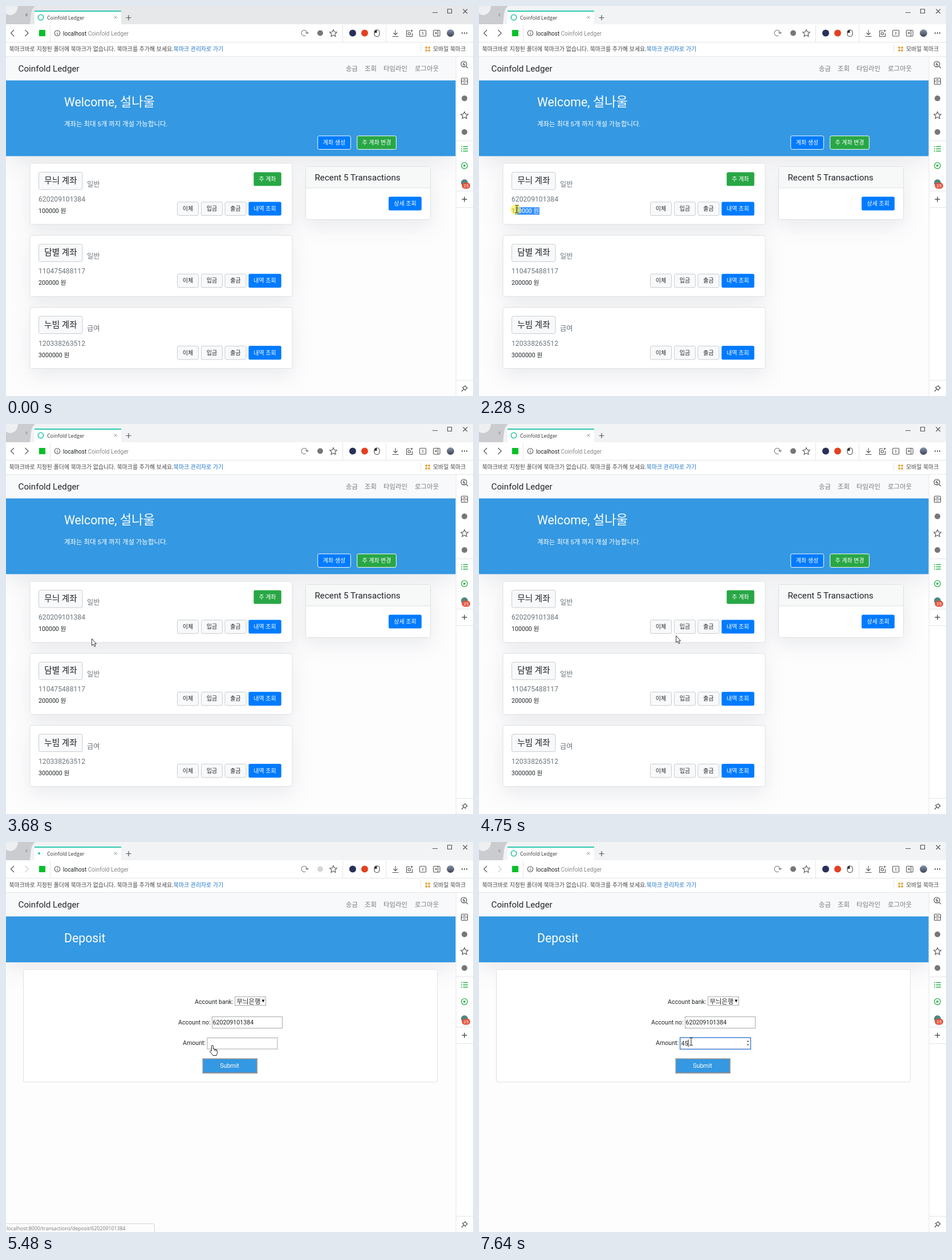
Recreate the animation shown at these times as an HTML page. Size 819 by 684 pixels, loop 8 s.

```html
<!DOCTYPE html>
<html lang="ko">
<head>
<meta charset="utf-8">
<title>Coinfold Ledger</title>
<style>
html, body { margin: 0; width: 100%; height: 100%; overflow: hidden; background: #fdfdfe; }
svg { display: block; }
text { font-family: Roboto, "Noto Sans CJK KR", "Noto Sans CJK", sans-serif; font-size: 10.64px; fill: #212529; white-space: pre; }
.ui { font-family: "Open Sans", "Noto Sans CJK KR", "Noto Sans CJK", sans-serif; font-size: 8.9px; fill: #333; }
.bar { font-family: "Noto Sans CJK KR", "Noto Sans CJK", sans-serif; font-size: 9.9px; fill: #444; }
.h1 { font-size: 21.3px; fill: #fff; }
.h5 { font-size: 15.2px; }
.nav { font-size: 11.4px; fill: #777b80; }
.mid { text-anchor: middle; }
.ko { font-size: 10px; }
.name { font-size: 14.6px; font-weight: 300; }
.num { font-size: 12.16px; fill: #6c757d; }
.type { font-size: 12.3px; fill: #6c757d; }
.white, .sel text { fill: #fff; }
.banner { fill: #3498e2; filter: drop-shadow(0 12px 18px rgba(30,40,60,.09)); }
.card { fill: #fff; stroke: #dfe0e1; }
.lift { filter: drop-shadow(0 12px 17px rgba(30,40,60,.09)); }
.btn { fill: #f8f9fa; stroke: #c9ccd0; }
.blue { fill: #007bff; }
.green { fill: #28a745; }
.input { fill: #fff; stroke: #a9a9a9; }
.line { fill: none; stroke: #e4e5e7; }
.icon { fill: none; stroke: #555; stroke-width: 1.2; }
.off { opacity: .3; }
</style>
</head>
<body>
<svg width="819" height="684" viewBox="0 0 819 684">
  <defs>
    <clipPath id="clip">
      <rect id="selAmount" y="353" height="13"/>
      <rect id="selNumber" x="57" y="331" width="85" height="16"/>
      <rect id="selType" x="139" y="304" width="29" height="18"/>
    </clipPath>
    <linearGradient id="face" x2="0" y2="1"><stop stop-color="#8796b0"/><stop offset="1" stop-color="#3c4350"/></linearGradient>
  </defs>

  <g id="home">
    <rect class="banner" y="130" width="789" height="133.300"/>
    <text class="h1" x="102" y="176">Welcome, <tspan font-size="22.2" font-weight="300">설나울</tspan></text>
    <text class="white" x="102" y="211" style="font-size:11.45px">계좌는 최대 5개 까지 개설 가능합니다.</text>
    <g stroke="#fff"><rect class="blue" x="546.7" y="227.8" width="57.700" height="23.600" rx="2.5"/><rect class="green" x="615.7" y="227.8" width="68.600" height="23.600" rx="2.5"/></g>
    <text class="ko mid white" x="575.5" y="243">계좌 생성</text>
    <text class="ko mid white" x="650" y="243">주 계좌 변경</text>
    <g id="cards"></g>
    <rect class="green" x="434.4" y="291.4" width="48.400" height="24.200" rx="2.5"/>
    <text class="ko mid white" x="458.500" y="306.500">주 계좌</text>
    <g id="sel" class="sel" clip-path="url(#clip)">
      <rect x="50" y="300" width="120" height="70" fill="#3390ff"/>
      <text class="type" x="142" y="317">일반</text>
      <text class="num" x="57" y="343">620209101384</text>
      <text x="57" y="363">100000 원</text>
    </g>
    <rect class="card lift" x="525.5" y="281.500" width="219" height="93" rx="3"/>
    <path d="M526 282H744V319H526z" fill="#f7f8f8"/>
    <path class="line" d="M526 319H744" style="stroke:#dfe0e1"/>
    <text class="h5" x="541.500" y="306">Recent 5 Transactions</text>
    <rect class="blue" x="671" y="334.4" width="57.800" height="24.200" rx="2.5"/>
    <text class="ko mid white" x="700" y="350">상세 조회</text>
  </g>

  <g id="deposit">
    <rect class="banner" y="130" width="789" height="81"/>
    <text class="h1" x="102" y="176">Deposit</text>
    <rect class="card" x="30.500" y="223.500" width="726" height="197.500" rx="3"/>
    <text x="331" y="284">Account bank:</text>
    <rect class="input" x="401.500" y="271.500" width="54" height="15"/>
    <text x="404.500" y="283.500" style="font-size:11.4px">무늬은행</text>
    <path d="M448.500 276.500H453.500L451 281.500z" fill="#111"/>
    <text x="302" y="320">Account no:</text>
    <rect class="input" x="361.500" y="306.500" width="123" height="20"/>
    <text x="362.500" y="320">620209101384</text>
    <text x="310" y="356">Amount:</text>
    <rect class="input" x="353" y="343.500" width="123" height="19.500"/>
    <rect id="focus" x="352.500" y="343" width="124" height="20.500" fill="none" stroke="#4d8ce4" stroke-width="1.4"/>
    <path id="spin" d="M469.500 350.500L471.500 348L473.500 350.500zM469.500 354.500L471.500 357L473.500 354.500z" fill="#444"/>
    <text id="amount" x="354.500" y="356.500"></text>
    <path id="caret" d="M0 346.500V359.500" stroke="#111"/>
    <path d="M344 379H441V406H344z" fill="#8f9499"/>
    <path d="M346 381H439V404H346z" fill="#3498e2"/>
    <path d="M344.500 405.500V379.500H440.500" fill="none" stroke="#c3c7cb"/>
    <text class="mid white" x="392" y="396">Submit</text>
  </g>

  <path d="M0 88H789V130.600H0z" fill="#f8f9fa"/>
  <text class="h5" x="21.500" y="115">Coinfold Ledger</text>
  <text class="nav" x="596" y="113.500">송금</text>
  <text class="nav" x="629" y="113.500">조회</text>
  <text class="nav" x="662" y="113.500">타임라인</text>
  <text class="nav" x="717" y="113.500">로그아웃</text>

  <g id="status">
    <path d="M-1 669.500H258Q260.500 669.500 260.500 672V685H-1z" fill="#fdfdfd" stroke="#d2d4d6"/>
    <text class="ui" x="1" y="681" style="font-size:8.73px;fill:#777">localhost:8000/transactions/deposit/620209101384</text>
  </g>

  <!-- sidebar -->
  <path d="M788.600 88H819V684H788.600z" fill="#fff"/>
  <path class="line" d="M789.200 88V684M790 236.500H819M790 324.500H819M790 353.500H819M790 656.500H819"/>
  <g class="icon">
    <circle cx="803" cy="102" r="5"/><path d="M807 106L810 109M804 98.500L801.500 102.500H804.500L802.500 106"/>
    <rect x="798.500" y="126.500" width="11" height="11" rx="1.500"/><path d="M798.500 132H809.500M802 129.300H806M802 135H806"/>
    <path d="M804 185.500L805.900 189.500 810.200 190 807 193 807.900 197.300 804 195.100 800.100 197.300 801 193 797.800 190 802.100 189.500z"/>
    <path d="M799.500 339H808.500M804 334.500V343.500" stroke-width="1.500"/>
    <path d="M805 666L809 670L807.500 670.500L805.500 674L800.500 669L804 667.500zM803 671.500L799 676"/>
  </g>
  <circle cx="804" cy="162" r="5" fill="#777"/>
  <circle cx="804" cy="221" r="5" fill="#777"/>
  <g fill="none" stroke="#27ae45" stroke-width="1.700">
    <path d="M798 246.500H800M801.500 246.500H810M798 250.500H800M801.500 250.500H810M798 254.500H800M801.500 254.500H810"/>
    <circle cx="804" cy="280" r="5.300" stroke-width="1.300"/><path d="M802.800 278V282L806 280z" fill="#27ae45" stroke-width=".8"/>
  </g>
  <circle cx="804" cy="310" r="6" fill="#4f857f"/>
  <rect x="799.500" y="310" width="14.500" height="10.500" rx="5" fill="#e2533c"/>
  <text class="mid white" x="806.800" y="318.300" style="font-size:8px">25</text>

  <!-- window frame -->
  <path id="title" d="M0 0H819V32H0z"/>
  <path d="M0 0H51Q45 5 44 14L42 32H0z" fill="#cbcccf"/>
  <path d="M0 0H21Q20 14 8 16Q3 16 0 13z" fill="#eeeff0"/>
  <ellipse id="eye" cx="36" cy="15.500" rx="1.800" ry="2.800"/>
  <path d="M50 8H202V32H50z" fill="#fff"/>
  <path d="M50 8H202V10H50z" fill="#2cc9b0"/>
  <circle id="ring" cx="61" cy="20" r="4.700" fill="none" stroke="#20c3a8" stroke-width="1.600"/>
  <circle id="dot" cy="20" fill="#20c3a8"/>
  <text class="ui" x="72" y="23.500">Coinfold Ledger</text>
  <path class="icon" d="M189.500 17.500L194.500 22.500M194.500 17.500L189.500 22.500" style="stroke:#999;stroke-width:1"/>
  <path class="icon" d="M210.500 20.500H219.500M215 16V25"/>
  <path class="icon" d="M748 11.500H757M774.500 5.500H781.500V12.500H774.500zM801.500 5.500L809 13M809 5.500L801.500 13"/>

  <path d="M0 32H819V88H0z" fill="#fff"/>
  <path class="line" d="M0 63.500H819M0 88.500H819M77.500 33V63M590.500 33V63M666.500 33V63M727.500 68V82"/>
  <path class="icon" d="M14 42L8.500 47.500L14 53" stroke-width="1.400"/>
  <path id="forward" class="icon" d="M33.500 42L39 47.500L33.500 53"/>
  <path d="M58 42H69V53H58z" fill="#06c02a"/>
  <g class="icon" style="stroke-width:1.100">
    <circle cx="90" cy="47.500" r="4.700"/><path d="M90 44.500V45.700M90 47V50.500"/>
    <path d="M525.500 51.800A5 5 0 1 1 528 47.500M525.500 46L528 48.500L530.500 46" stroke="#777"/>
    <path d="M574 41.500L575.900 45.500 580.200 46 577 49 577.900 53.300 574 51.100 570.100 53.300 571 49 567.800 46 572.100 45.500z"/>
    <path d="M683 42V50.500M679.500 47L683 50.500L686.500 47M677.500 53.500H688.500"/>
    <path d="M708 43.500H702.500V53.500H712.500V47.500M709.500 43.500H713.500M711.500 41.500V45.500"/><circle cx="707.300" cy="48.500" r="2.200"/>
    <rect x="725.500" y="42.500" width="11" height="10.500" rx="1.500"/><path d="M731 45V50.500"/>
    <rect x="749.500" y="42.500" width="11.500" height="10.500" rx="1.500"/><path d="M757.500 42.500V53M752 47.500H756M754 45.500V49.500"/>
  </g>
  <circle id="tool" cx="551" cy="47.500" r="5" fill="#777"/>
  <circle cx="608" cy="47.500" r="6" fill="#27305a"/>
  <circle cx="629" cy="47.500" r="6" fill="#e4401f"/>
  <path d="M646 46Q646 42 650.500 42T655 46V49Q655 53.500 650.500 53.500T646 49z" fill="#fff" stroke="#333"/>
  <path d="M646 47V46Q646 42 650.500 42V47z" fill="#333"/>
  <circle cx="779.500" cy="47.500" r="6.500" fill="url(#face)"/>
  <path d="M799 47.500H801M803 47.500H805M807 47.500H809" stroke="#444" stroke-width="2"/>
  <text x="100" y="51.500" style="font-size:10.100px">localhost <tspan fill="#888">Coinfold Ledger</tspan></text>
  <text class="bar" x="5.500" y="78.500">북마크바로 지정된 폴더에 북마크가 없습니다. 북마크를 추가해 보세요.<tspan fill="#1a73c8">북마크 관리자로 가기</tspan></text>
  <g fill="#e8a545"><circle cx="737" cy="73" r="2"/><circle cx="742" cy="73" r="2"/><circle cx="737" cy="78" r="2"/><circle cx="742" cy="78" r="2"/></g>
  <text class="bar" x="749" y="78.500">모바일 북마크</text>

  <!-- pointer, origin at its hot spot -->
  <g id="pointer">
    <circle id="press" cx="-2" cy="1" r="9" fill="#fbec30" opacity=".62"/>
    <path id="arrow" d="M.5 .5V12.500L3.200 10.200L5.200 14.500L7 13.700L5.200 9.500H8.500z" fill="#fff" stroke="#222" stroke-width=".9"/>
    <path id="hand" d="M-1.500 9.500V1.200A1.500 1.500 0 0 1 1.500 1.200V6L6.500 7Q8.500 7.500 8.500 9.500V12.500Q8.500 14.500 7 17.500H1Q-1 14.500 -4 11Q-5 9.500 -3.500 8.700Q-2.500 8.400 -1.500 9.500M4 6.500V9.500M6.400 7V9.800" fill="#fff" stroke="#222"/>
    <path id="beam" d="M-3 -6.500H-1Q0 -6.500 0 -5.500V5.500Q0 6.500 -1 6.500H-3M3 -6.500H1Q0 -6.500 0 -5.500M3 6.500H1Q0 6.500 0 5.500" fill="none" stroke="#222"/>
  </g>
</svg>
<script>
const LOOP = 8000;
const $ = id => document.getElementById(id);
const show = (id, on) => { $(id).style.display = on ? '' : 'none'; };
const set = (id, attrs) => { for (const k in attrs) $(id).setAttribute(k, attrs[k]); };
const within = (t, a, b) => t >= a && t < b;

const button = (label, x, id = '') => `
  <rect ${id} class="btn" x="${x + .5}" y="343.8" width="37" height="23.6" rx="2.5"/>
  <text class="ko mid" x="${x + 19}" y="359">${label}</text>`;

const accounts = [
  ['무늬', '일반', '620209101384', 100000],
  ['담별', '일반', '110475488117', 200000],
  ['누빔', '급여', '120338263512', 3000000],
];
$('cards').innerHTML = accounts.map(([bank, type, number, sum], i) => `
  <g transform="translate(0 ${(i * 126.3).toFixed(1)})">
    <rect class="card lift" x="42" y="276" width="460" height="107" rx="3"/>
    <rect class="btn" x="57.5" y="291.5" width="76.5" height="30.5" rx="3"/>
    <text class="name mid" x="96" y="311">${bank} 계좌</text>
    <text class="type" x="142" y="317">${type}</text>
    <text class="num" x="57" y="343">${number}</text>
    <text x="57" y="363">${sum} 원</text>
    ${button('이체', 300)}${button('입금', 342, i ? '' : 'id="hover"')}${button('출금', 383.5)}
    <rect class="blue" x="425.4" y="343.4" width="57.4" height="24.2" rx="2.5"/>
    <text class="ko mid white" x="454" y="359">내역 조회</text>
  </g>`).join('');

// start, end, steps, control x, y, target x, y
const moves = [
  [810, 1580, 11, 481, 439, 134, 369],
  [1660, 1890, 4, 120, 366, 107, 359],
  [2140, 2670, 8, 36, 370, 56, 300],
  [2900, 3220, 5, 50, 270, 150, 376],
  [4140, 4840, 10, 280, 432, 362, 357],
  [6100, 6170, 2, 367, 353, 372, 350],
];

function pointerAt(t) {
  let p = [800, 720];
  for (const [a, b, n, cx, cy, x, y] of moves) {
    if (t < a) break;
    const k = Math.floor((t - a) / (b - a) * (n - 1) + .25);
    const u = Math.min(1, (k + 1) / n), v = 1 - u;
    p = [v * v * p[0] + 2 * u * v * cx + u * u * x, v * v * p[1] + 2 * u * v * cy + u * u * y];
  }
  return p;
}

function drawPointer(t, x, y) {
  const beam = within(t, 1880, 3050) || t >= 6100;
  const hand = within(t, 4830, 6100);
  show('pointer', t >= 810);
  set('pointer', { transform: `translate(${x.toFixed(1)} ${y.toFixed(1)})` });
  show('beam', beam);
  show('hand', hand);
  show('arrow', !beam && !hand);
  show('press', within(t, 1890, 2970) || within(t, 3520, 3680) || within(t, 5140, 5250) || within(t, 6480, 6570));
}

function drawSelection(t, x, y) {
  const dragging = t < 2900;
  const chars = Math.max(0, Math.floor((x - 57) / 5.98));
  const left = dragging && y > 349 ? Math.min(106, 57 + chars * 5.98) : 57;
  show('sel', within(t, 2140, 3600));
  set('selAmount', { x: left, width: 106 - left });
  show('selNumber', !dragging || y < 349);
  show('selType', !dragging || y < 325);
}

function drawPage(t) {
  const loading = within(t, 5330, 5720);
  const typed = t < 7410 ? '' : t < 7640 ? '4' : '45';
  show('home', t < 5480);
  show('deposit', t >= 5480);
  set('hover', { style: t >= 4830 ? 'fill:#e2e6ea' : '' });
  show('status', within(t, 4990, 5640));
  set('title', { fill: t < 1890 ? '#e6e8ea' : '#f2f3f5' });
  set('eye', { fill: t < 1890 ? '#96999e' : '#aaadb2' });
  set('forward', { class: t < 5330 ? 'icon' : 'icon off' });
  set('tool', { class: within(t, 5330, 5640) ? 'off' : '' });
  show('ring', !loading);
  show('dot', loading);
  const grow = Math.max(0, Math.floor((t - 5405) / 75));
  set('dot', { cx: 57 + grow, r: 1 + grow });
  show('spin', t >= 6100);
  show('focus', t >= 6480);
  show('caret', within(t, 6480, 7030) || t >= 7410);
  set('caret', { transform: `translate(${355 + typed.length * 6} 0)` });
  $('amount').textContent = typed;
}

const start = performance.now();
function frame() {
  const t = (performance.now() - start) % LOOP;
  const [x, y] = pointerAt(t);
  drawPage(t);
  drawSelection(t, x, y);
  drawPointer(t, x, y);
  requestAnimationFrame(frame);
}
frame();
</script>
</body>
</html>
```
